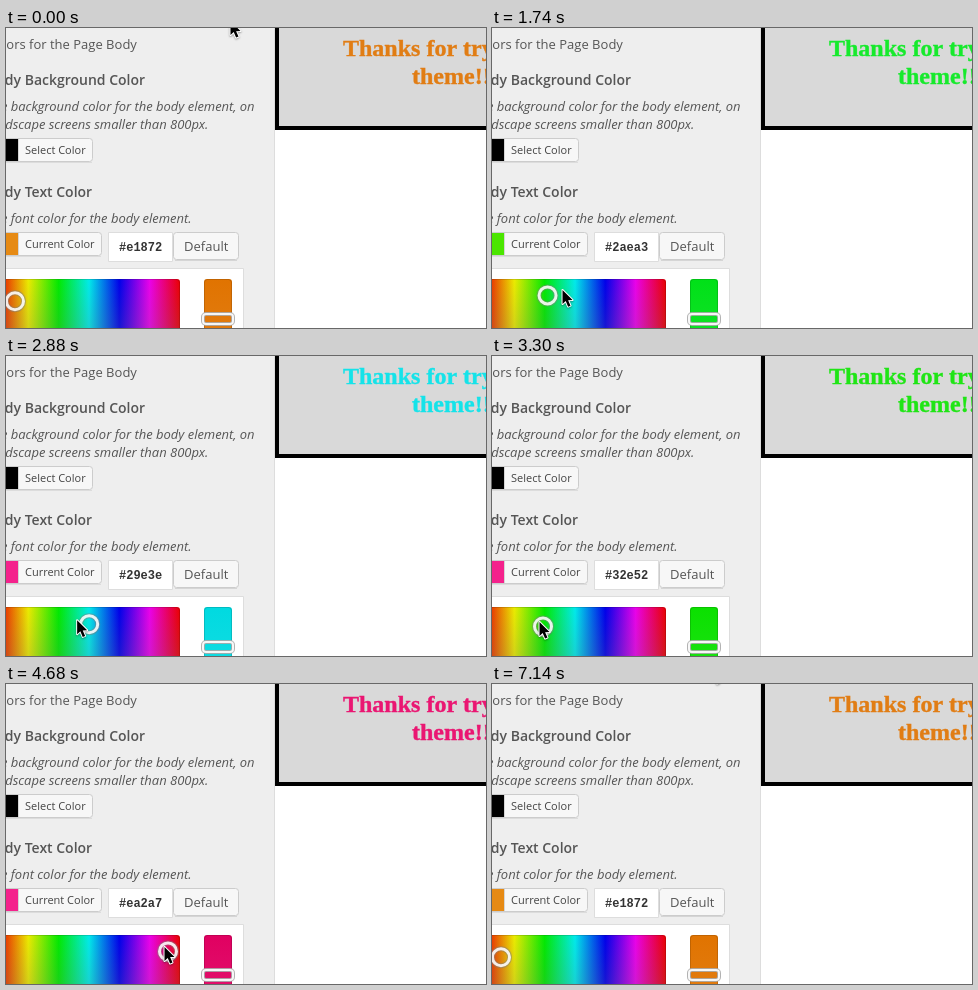
An HTML page with a canvas that plays this animation: 480x300 px, repeating every 7200 ms.

```html
<!DOCTYPE html>
<html lang="en">
<head>
<meta charset="utf-8">
<title>Body text color picker</title>
<style>
  html, body { margin: 0; width: 100%; height: 100%; overflow: hidden; background: #fff; }
  canvas { display: block; }
</style>
</head>
<body>
<canvas id="stage" width="480" height="300"></canvas>
<script>
const ctx = document.getElementById('stage').getContext('2d');
const LOOP = 7200, STEP = 60;
const SANS = '"Open Sans", sans-serif';
const LEFT = -19;
const DRAG_START = 1620, DRAG_END = 5820;
const HOME = { x: 9, y: 272.7 };
const ORANGE = '#e68a14', GREEN = '#4be600', PINK = '#f4228c';

// Pointer moves: start, end, x, y, ease-out power (2 unless given).
const MOVES = [
  [240, 720, 150, 283, 1], [720, 1380, 44, 263.3, 1],
  [1654, 2340, 159, 258], [2460, 3240, 48, 266], [3300, 3480, 42, 266],
  [3643, 4620, 159, 262.9], [5040, 5820, -14, 270, 1],
  [6599, 6600, 181, 209], [6600, 6780, 220, 2, 1],
  [6959, 6960, 167, 217], [6960, 7140, 220, -17, 1]
];
const SWATCHES = [[0, ORANGE], [1620, GREEN], [2400, PINK], [3480, GREEN], [4560, PINK], [5880, ORANGE]];

function pointer(t) {
  let x = 225, y = -7;
  for (const [start, end, toX, toY, power = 2] of MOVES) {
    if (t <= start) break;
    const u = 1 - Math.pow(1 - Math.min(1, (t - start) / (end - start)), power);
    x += (toX - x) * u;
    y += (toY - y) * u;
  }
  return { x, y };
}

// The ring trails the pointer by one step and stays inside the field.
function ringAt(t) {
  if (t < DRAG_START || t >= DRAG_END) return HOME;
  const p = pointer(t - STEP);
  return { x: Math.max(HOME.x, p.x + 3), y: Math.min(HOME.y, p.y + 4) };
}

function hueAt(x) {
  const d = x - 51;
  return 117.13 + 2.0277 * d - 0.000663 * d * d;
}

// Weight of one colour channel (0..1) for a hue.
function channel(hue, shift) {
  const d = Math.abs(((hue + shift) % 360 + 540) % 360 - 180);
  return Math.min(1, Math.max(0, (120 - d) / 60));
}

function pickedColor(hue, y, deepen = 0) {
  const max = 242 - (y - 262) * 1.6, min = 43 - (y - 262) * 0.3 - deepen;
  return '#' + [0, 240, 120].map(s =>
    Math.round(min + (max - min) * channel(hue, s)).toString(16).padStart(2, '0')).join('');
}

function rect(x, y, w, h, fill) {
  ctx.fillStyle = fill;
  ctx.fillRect(x, y, w, h);
}

function roundPath(x, y, w, h, r) {
  ctx.beginPath();
  ctx.roundRect(x, y, w, h, r);
}

function stroke(color, width) {
  ctx.strokeStyle = color;
  ctx.lineWidth = width;
  ctx.stroke();
}

function box(x, y, w, h, fill, line, r = 3) {
  roundPath(x + 0.5, y + 0.5, w - 1, h - 1, r);
  ctx.fillStyle = fill;
  ctx.fill();
  stroke(line, 1);
}

function text(str, x, y, font, color) {
  ctx.font = font;
  ctx.fillStyle = color;
  ctx.fillText(str, x, y);
}

function colorButton(label, y, width, swatch) {
  rect(-2, y + 24, width + 1, 1, '#dcdcdc');
  box(-10, y, width + 10, 24, '#f7f7f7', '#ccc');
  rect(0, y + 1, 12, 22, swatch);
  rect(12, y + 1, 1, 22, '#d5d5d5');
  text(label, 19, y + 16, '11px ' + SANS, '#444');
}

function preview(color) {
  rect(268, 0, 212, 300, '#fff');
  rect(268, 0, 1, 300, '#ddd');
  rect(269, 0, 211, 102, '#000');
  rect(273, 0, 207, 98, '#d9d9d9');
  ctx.strokeStyle = color;
  ctx.lineWidth = 0.4;
  [['Thanks for trying', 337, 28], ['theme!!', 406, 56]].forEach(line => {
    text(...line, 'bold 24px "Liberation Serif", serif', color);
    ctx.strokeText(...line);
  });
}

function labels() {
  const plain = '13px ' + SANS, head = '600 14px ' + SANS, note = 'italic 13px ' + SANS;
  [
    ['Colors for the Page Body', 21, plain],
    ['Body Background Color', 57, head],
    ['The background color for the body element, on', 83, note],
    ['landscape screens smaller than 800px.', 101, note],
    ['Body Text Color', 169, head],
    ['The font color for the body element.', 195, note]
  ].forEach(([str, y, font]) => text(str, LEFT, y, font, '#555'));
}

// Fills a bar of the picker with the given layers and a thin dark edge.
function bar(x, width, ...layers) {
  roundPath(x, 251, width, 60, 3);
  for (const layer of layers) {
    ctx.fillStyle = layer;
    ctx.fill();
  }
  roundPath(x + 0.5, 251.5, width - 1, 60, 3);
  stroke('rgba(0,0,0,.14)', 1);
}

function fade(from, to) {
  const g = ctx.createLinearGradient(0, 251, 0, 300);
  g.addColorStop(0, from);
  g.addColorStop(1, to);
  return g;
}

function spectrum() {
  const left = -8, width = 182;
  const hues = ctx.createLinearGradient(left, 0, left + width, 0);
  for (let i = 0; i <= 24; i++) hues.addColorStop(i / 24, `hsl(${i * 15}, 100%, 46%)`);
  bar(left, width, hues, fade('rgba(115,115,115,0)', 'rgba(115,115,115,.2)'));
}

function strip(hue) {
  bar(198, 28, fade(`hsl(${hue}, 100%, 44%)`, `hsl(${hue}, 88%, 47%)`));
  ctx.save();
  ctx.globalAlpha = 0.9;
  roundPath(197, 286, 30, 10, 3);
  stroke('#aaa', 4);
  stroke('#fff', 2);
  ctx.restore();
}

function ring({ x, y }) {
  ctx.beginPath();
  ctx.arc(x, y + 0.5, 8.5, 0, Math.PI * 2);
  stroke('rgba(128,128,128,.5)', 5);
  stroke('rgba(255,255,255,.88)', 3);
}

function arrow({ x, y }) {
  ctx.save();
  ctx.translate(x - 0.5, y);
  const outline = new Path2D('M0 0V14L3.2 11 5.6 16.6 8 15.6 5.6 10.2 10 10Z');
  ctx.lineJoin = 'round';
  ctx.shadowColor = 'rgba(0,0,0,.35)';
  ctx.shadowBlur = 2;
  ctx.shadowOffsetY = 1;
  ctx.strokeStyle = '#fff';
  ctx.lineWidth = 2;
  ctx.stroke(outline);
  ctx.shadowColor = 'transparent';
  ctx.fillStyle = '#000';
  ctx.fill(outline);
  ctx.restore();
}

function draw(t) {
  const spot = ringAt(t);
  const hue = hueAt(spot.x);
  const swatch = SWATCHES.filter(s => s[0] <= t).pop()[1];

  rect(0, 0, 480, 300, '#eee');
  preview(pickedColor(hue, spot.y, 20));
  labels();
  colorButton('Select Color', 110, 87, '#000');
  colorButton('Current Color', 204, 96, swatch);

  box(102, 204, 65, 30, '#fff', '#ddd', 0);
  text(pickedColor(hue, spot.y).slice(0, 6), 113, 223, 'bold 12px "Liberation Mono", monospace', '#333');
  rect(169, 232, 62, 1, '#d5d5d5');
  box(167, 204, 66, 28, '#f7f7f7', '#ccc');
  text('Default', 178, 223, '13px ' + SANS, '#555');

  box(-10, 240, 248, 80, '#fff', '#ddd', 0);
  spectrum();
  strip(hue);
  ring(spot);
  arrow(pointer(t));
}

const begin = performance.now();
function tick() {
  const t = (performance.now() - begin) % LOOP;
  draw(Math.floor(t / STEP) * STEP);
  requestAnimationFrame(tick);
}
tick();
</script>
</body>
</html>
```
